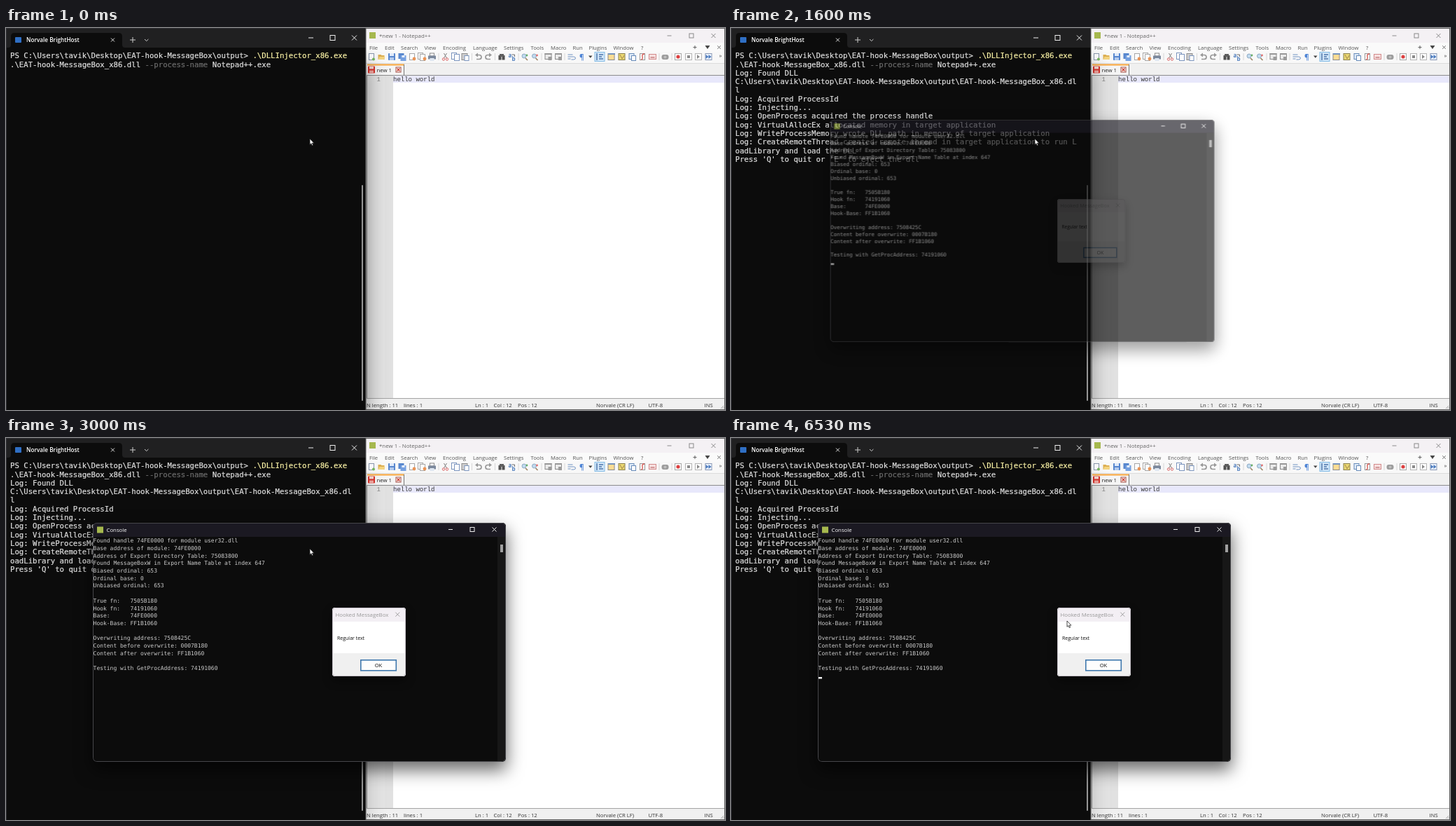
An HTML page that plays this animation: 1027x545 px, repeating every 6.57 s.

```html
<!DOCTYPE html>
<html lang="en">
<head>
<meta charset="utf-8">
<title>Hook demo</title>
<style>
html, body { margin: 0; width: 100%; height: 100%; overflow: hidden; background: #0c0c0c; }
#stage { position: absolute; left: 0; top: 0; width: 1027px; height: 545px; overflow: hidden; }
#stage > div, svg { position: absolute; left: 0; top: 0; display: block; }
text { white-space: pre; font-family: "Open Sans", "Noto Sans", sans-serif; }
.mono { font-family: "DejaVu Sans Mono", monospace; }
.courier { font-family: "Liberation Mono", monospace; }

#stage .loop, .loop { animation-duration: 6570ms; animation-iteration-count: infinite; animation-timing-function: linear; }
#stage .hard, .hard { animation-timing-function: step-end; }

#shade { width: 514px; height: 600px; box-shadow: 0 50px 30px rgba(0,0,0,.45); animation-name: shade; }
#logs { width: 513px; overflow: hidden; animation-name: logs; }
#caret { animation-name: caret; }
#blink { animation-name: blink; }
#stage > #console { left: 124px; top: 121px; width: 590px; height: 341px; z-index: 2; border-radius: 5px;
  box-shadow: 0 11px 25px 1px rgba(0,0,0,.58); transform-origin: 252px 142px; animation-name: open; }
#stage > #boxLayer { width: 1027px; height: 545px; z-index: 1; animation-name: raise; }
#box { position: absolute; left: 466px; top: 242px; width: 105px; height: 98px; border-radius: 4px;
  box-shadow: 0 6px 14px rgba(0,0,0,.45); transform-origin: 0 28px; animation-name: openBox; }
#console svg, #box svg { border-radius: inherit; }
#stage > #mouse { z-index: 9; animation-name: mouse; }

@keyframes shade { 0%, 23.74% { opacity: 1 } 26.33%, 100% { opacity: .45 } }
@keyframes caret { 0%, 12.18%, 100% { opacity: 0 } 3.5% { opacity: 1 } }
@keyframes logs {
  0% { height: 58px } 17.2% { height: 94px } 18.26% { height: 119px }
  19.3% { height: 156px } 20.2% { height: 181px } 20.8%, 100% { height: 200px }
}
@keyframes open {
  0%, 23.74% { opacity: 0; transform: scale(.9) }
  24.35% { opacity: .65; transform: scale(.929) }
  24.9% { opacity: 1; transform: scale(.968) }
  26.33% { opacity: 1; transform: scale(.998) }
  27.4%, 100% { opacity: 1; transform: none }
}
@keyframes openBox {
  0%, 23.74% { opacity: 0; transform: scale(.9) }
  24.35% { opacity: .5; transform: scale(.928) }
  25.2% { opacity: 1; transform: scale(.98) }
  26.5%, 100% { opacity: 1; transform: none }
}
@keyframes raise { 0% { z-index: 1 } 26.9%, 100% { z-index: 3 } }
@keyframes blink {
  0%, 47.64%, 63.93%, 80.21%, 96.35%, 100% { opacity: 1 }
  39.57%, 55.86%, 71.99%, 88.74% { opacity: 0 }
}
@keyframes mouse {
  0%, 46.73% { transform: translate(434px, 158px); animation-timing-function: ease-in-out }
  54.8% { transform: translate(473px, 259px) }
  58.3% { transform: translate(476px, 261px) }
  60.9% { transform: translate(480px, 261px) }
  62.86%, 68% { transform: translate(484px, 261px) }
  71.8%, 100% { transform: translate(480px, 261px) }
}
</style>
</head>
<body>
<div id="stage">
  <svg id="desk" width="1027" height="545"></svg>
  <div id="shade" class="loop"></div>
  <div id="logs" class="loop hard"><svg id="logText" width="513" height="545"></svg></div>
  <div id="console" class="loop"><svg id="consoleArt" width="590" height="341" viewBox="124 121 590 341"></svg></div>
  <div id="boxLayer" class="loop hard">
    <div id="box" class="loop"><svg id="boxArt" width="105" height="98" viewBox="466 242 105 98"></svg></div>
  </div>
  <div id="mouse" class="loop"><svg width="10" height="14" style="overflow:visible">
    <path d="M0 0V8.4L1.9 6.7 3.2 9.7 4.6 9.1 3.3 6.2H5.9Z" fill="#fff" stroke="#222" stroke-width=".8"/>
  </svg></div>
</div>
<script>
const $ = id => document.getElementById(id);
const esc = s => s.replace(/&/g, '&amp;').replace(/</g, '&lt;').replace(/>/g, '&gt;');
const rect = (x, y, w, h, fill, more = '') => `<rect x="${x}" y="${y}" width="${w}" height="${h}" fill="${fill}" ${more}/>`;
const frame = (x, y, w, h, stroke, width = 1, fill = 'none') =>
  rect(x, y, w, h, fill, `stroke="${stroke}" stroke-width="${width}"`);
const line = (d, stroke, width = 1) => `<path d="${d}" fill="none" stroke="${stroke}" stroke-width="${width}"/>`;
const shape = (d, fill) => `<path d="${d}" fill="${fill}"/>`;
const disc = (x, y, r, fill, more = '') => `<circle cx="${x}" cy="${y}" r="${r}" fill="${fill}" ${more}/>`;
const text = (x, y, s, size, fill, more = '') =>
  `<text x="${x}" y="${y}" font-size="${size}" fill="${fill}" ${more}>${s.includes('<tspan') ? s : esc(s)}</text>`;
const span = (s, fill) => `<tspan fill="${fill}" stroke="${fill}">${esc(s)}</tspan>`;
const mono = 'class="mono"';

const cross = (x, y, r, c, w = 1) => line(`M${x - r} ${y - r}l${2 * r} ${2 * r}M${x - r} ${y + r}l${2 * r} ${-2 * r}`, c, w);
const windowButtons = (xs, y, r, c) =>
  line(`M${xs[0] - r} ${y}h${2 * r}`, c) + frame(xs[1] - r, y - r, 2 * r, 2 * r, c) + cross(xs[2], y, r, c);

// Terminal window
const plain = '#dedede';
const termRow = (n, s) => text(6, 43.2 + n * 12.31, s, 10.66, plain, `${mono} stroke="${plain}" stroke-width=".22"`);

function terminal() {
  const user = 'tavik';
  return rect(0, 0, 514, 545, '#0c0c0c') + rect(0, 0, 514, 28, '#202021') +
    shape('M3 28q4 0 4-4V12q0-5 5-5H161q5 0 5 5V24q0 4 4 4Z', '#0c0c0c') +
    rect(13, 13, 9, 8, '#2f6fc4', 'rx="1"') +
    text(29, 20, 'Norvale BrightHost', 8.2, '#fff', 'font-weight="600"') +
    cross(152.5, 17, 2.5, '#ddd') +
    line('M177 17h8M181 13v8', '#ccc') + line('M198 16l2.7 2.6 2.7-2.6', '#ccc') +
    windowButtons([435.5, 466.5, 497.5], 14, 3.5, '#eee') +
    termRow(0, span(`PS C:\\Users\\${user}\\Desktop\\EAT-hook-MessageBox\\output> `, plain) +
      span('.\\DLLInjector_x86.exe', '#f9f1a5')) +
    termRow(1, span('.\\EAT-hook-MessageBox_x86.dll ', plain) +
      span('--process-name', '#6c6c6c') + span(' Notepad++.exe', plain)) +
    `<g id="caret" class="loop hard">${rect(377.6, 45.5, 1.2, 12, '#fff')}</g>` +
    rect(508, 224, 2, 308, '#969696', 'rx="1"') +
    line('M.5 0V545M0 .5H514', '#303035');
}

const logLines = [
  'Log: Found DLL',
  'C:\\Users\\tavik\\Desktop\\EAT-hook-MessageBox\\output\\EAT-hook-MessageBox_x86.dl',
  'l',
  'Log: Acquired ProcessId',
  'Log: Injecting...',
  'Log: OpenProcess acquired the process handle',
  'Log: VirtualAllocEx allocated memory in target application',
  'Log: WriteProcessMemory wrote DLL path in memory of target application',
  'Log: CreateRemoteThread created remote thread in target application to run L',
  'oadLibrary and load the DLL',
  "Press 'Q' to quit or 'E' to eject the dll"
];

// Toolbar icons, each centred on (x, 41)
const Y = 41;
const page = (x, c = '#7788a0', y = Y) => frame(x - 3.5, y - 4.5, 7, 9, c, 1, '#fff');
const icon = {
  fresh: x => page(x) + disc(x + 3, Y + 3.5, 2, '#62ae45'),
  open: x => shape(`M${x - 5} 45v-7h4l1 1h4v6z`, '#d9a437') + shape(`M${x - 5} 45l2-4h8l-2 4z`, '#f5cf6a'),
  save: x => rect(x - 5, 36, 10, 10, '#3d74c7', 'rx="1"') + rect(x - 3, 36, 6, 4, '#dce8fa') + rect(x - 3, 42, 6, 4, '#a9c4ec'),
  saveAll: x => rect(x - 5, 36, 8, 8, '#3d74c7') + rect(x - 2, 39, 8, 8, '#5f91dc') + rect(x, 39, 4, 3, '#e3edfc'),
  close: x => page(x, '#999') + disc(x + 3, 44, 2.4, '#e8833a'),
  closeAll: x => page(x - 2, '#999', 40) + page(x + 1, '#999', 42) + disc(x + 4, 44, 2.4, '#e8833a'),
  print: x => frame(x - 3, 36, 6, 4, '#777', 1, '#fff') + rect(x - 5.5, 39.5, 11, 5, '#66758c') + rect(x - 3, 43, 6, 4, '#dbe5f2'),
  cut: x => line(`M${x - 2} 36l4 7M${x + 2} 36l-4 7`, '#666') +
    disc(x - 2.5, 44.5, 1.7, 'none', 'stroke="#d44a4a"') + disc(x + 2.5, 44.5, 1.7, 'none', 'stroke="#d44a4a"'),
  copy: x => page(x - 2, '#6684b4', 40) + page(x + 2, '#6684b4', 42),
  paste: x => frame(x - 5, 36.5, 8, 9, '#7b7b7b', 1, '#c9c9c9') + frame(x - 1, 39.5, 6, 7, '#6684b4', 1, '#fff'),
  undo: x => line(`M${x - 3} 38.5h4q3 0 3 3t-3 3h-4`, '#888', 1.7) + shape(`M${x - 5} 38.5l4-3v6z`, '#888'),
  redo: x => line(`M${x + 3} 38.5h-4q-3 0-3 3t3 3h4`, '#888', 1.7) + shape(`M${x + 5} 38.5l-4-3v6z`, '#888'),
  find: x => rect(x - 4.5, 39, 4, 6.5, '#333') + rect(x + .5, 39, 4, 6.5, '#333') + rect(x - 3, 37, 6, 4, '#444'),
  replace: x => text(x - 5, 42, 'a', 8, '#3268b3', 'font-weight="700"') + text(x, 47, 'b', 8, '#3268b3', 'font-weight="700"') + line(`M${x} 38h4v3`, '#555'),
  zoomIn: x => disc(x - 1, 40, 3, '#b9d6ee', 'stroke="#7a9bb8"') + line(`M${x + 1} 43l3 3`, '#8a6d4a', 1.6) + disc(x + 3, 39, 1.4, '#4da34d'),
  zoomOut: x => disc(x - 1, 40, 3, '#b9d6ee', 'stroke="#7a9bb8"') + line(`M${x + 1} 43l3 3`, '#8a6d4a', 1.6) + disc(x + 3, 39, 1.4, '#d55'),
  sync: x => frame(x - 4.5, 36.5, 9, 8, '#777', 1, '#e9e9e9') + rect(x - 5, 36, 10, 2, '#888') + rect(x, 41, 5, 5, '#8b8b8b'),
  wrap: x => line(`M${x - 5} 38h7M${x - 5} 41h8q3 0 3 2t-3 2h-3M${x - 5} 44h4`, '#557fb8'),
  pilcrow: x => text(x - 3, 45, '¶', 10, '#2f6fd0', 'font-weight="700"'),
  guide: x => rect(x - 7, 34.5, 14, 13, '#cce4f7', 'stroke="#6fb1e4"') + line(`M${x - 4} 36v10`, '#2f5f9e', 1.5) +
    line(`M${x - 1} 38h6M${x - 1} 41h4M${x - 1} 44h6`, '#2f5f9e', 1.3),
  panel: x => frame(x - 5, 36.5, 9, 9, '#777', 1, '#ffd983') + rect(x - 5, 36, 10, 2, '#5d82b5'),
  map: x => frame(x - 5, 36.5, 9, 9, '#776a30', 1, '#e7d35c') + line(`M${x - 3} 38l3 6 3-5`, '#946e2a'),
  list: x => frame(x - 4.5, 36.5, 7, 8, '#4e78af', 1, '#dce9f9') + frame(x - 1, 39.5, 6, 7, '#4e78af', 1, '#fff'),
  func: x => page(x, '#888') + line(`M${x - 2} 45q3 0 2-4t3-4`, '#d4433b', 1.4),
  folder: x => frame(x - 5, 37.5, 10, 7, '#c77', 1, '#f7dede') + rect(x - 3, 41, 6, 2, '#c88'),
  watch: x => rect(x - 5, 38, 10, 7, '#8d8d8d', 'rx="3"') + disc(x, 41.5, 2, '#b5b5b5'),
  record: x => frame(x - 4.5, 36.5, 9, 9, '#999', 1, '#fff') + disc(x, Y, 2.6, '#d81f1f'),
  stop: x => frame(x - 4.5, 36.5, 9, 9, '#aaa', 1, '#fff') + rect(x - 2, 39, 4, 4, '#777'),
  play: x => frame(x - 4.5, 36.5, 9, 9, '#aaa', 1, '#fff') + shape(`M${x - 2} 38l4 3-4 3z`, '#777'),
  forward: x => frame(x - 4.5, 36.5, 9, 9, '#78a', 1, '#eef5ff') + shape(`M${x - 4} 38l4 3-4 3zM${x} 38l4 3-4 3z`, '#2f66b5')
};
const toolbar = {
  fresh: 522, open: 536.5, save: 551, saveAll: 565.5, close: 580, closeAll: 594, print: 608.5, cut: 627.5, copy: 642,
  paste: 656, undo: 675, redo: 689, find: 708, replace: 722.5, zoomIn: 741, zoomOut: 755.5, wrap: 807.5, pilcrow: 822,
  guide: 848, panel: 865, map: 880, list: 894.5, func: 909, folder: 923.5, watch: 941.5, record: 960, stop: 975,
  play: 989, forward: 1003.5
};
const menu = {
  File: 519, Edit: 541, Search: 564, View: 597.5, Encoding: 624, Language: 667, Settings: 711, Tools: 749.5,
  Macro: 778, Run: 809.5, Plugins: 832.5, Window: 867.5, '?': 907
};
const status = {
  'N length : 11': 515, 'lines : 1': 568, 'Ln : 1': 670, 'Col : 12': 696.5, 'Pos : 12': 731,
  'Norvale (CR LF)': 843, 'UTF-8': 917.5, 'INS': 997.5
};
const labels = (set, y, size, fill) => Object.entries(set).map(([s, x]) => text(x, y, s, size, fill)).join('');

function editor() {
  const separators = [618, 665.5, 698.5, 732, 765, 798, 933, 951];
  return rect(514, 0, 513, 545, '#f0f0f0') + rect(514, 0, 513, 21, '#f4f1f4') +
    rect(514, 21, 513, 13, '#fafafa') + rect(514, 34, 513, 17, '#f8f8f8') +
    rect(519, 6, 9, 9, '#a6b84e') +
    text(533, 13.8, '*new 1 - Notepad++', 7.9, '#666') +
    windowButtons([947.5, 979, 1010.5], 11, 3, '#8a8a8a') +
    labels(menu, 30.6, 7.7, '#555') +
    line('M981.5 27.5h5M984 25v5', '#555', .9) + shape('M998.5 25h7l-3.5 5z', '#444') + cross(1018.5, 27.5, 2.2, '#666') +
    '<g opacity=".85">' +
    separators.map(x => line(`M${x} 36v10`, '#d2d2d2')).join('') +
    Object.entries(toolbar).map(([name, x]) => icon[name](x)).join('') +
    icon.sync(774.5) + icon.sync(789) +
    shape('M832 39.5h5.5l-2.7 3.2z', '#222') + text(1018.5, 42, '»', 8, '#333') + '</g>' +
    line('M514 50.5H1027', '#dcdcdc') +
    rect(516, 52, 53, 15, '#f5f5f5') + rect(516, 51.5, 53, 2, '#faa63a') + line('M568.5 52V67', '#777') +
    rect(517, 54.5, 10, 10, '#d8322b', 'rx="1"') + rect(519, 55, 6, 3.5, '#f8d8d4') + rect(519, 60.5, 6, 4, '#f3aaa4') +
    text(529.5, 63, 'new 1', 7.8, '#222') +
    frame(557, 56, 7, 7, '#a24a40', 1, '#fff') + cross(560.5, 59.5, 2, '#c83a2c', 1.3) +
    rect(515, 67, 511, 462, '#fff') + rect(516, 68, 25, 461, '#e4e4e4') + rect(541, 68, 12, 461, '#e1e1e1') +
    rect(553, 68, 473, 10, '#e8e8fb') +
    line('M515 67.5H1026M515.5 67V529', '#8c8c8c') + line('M515 528.5H1026', '#a4a4a4') +
    text(529.5, 75.7, '1', 9, '#888', 'class="courier"') +
    text(553, 75.7, 'hello world', 9, '#333', 'class="courier"') +
    labels(status, 540.8, 7.7, '#333') +
    line('M1021 543l4-4M1023.5 543l2-2', '#aaa') +
    line('M514 0V545M514 .5H1027M514 544.5H1027M1026.5 0V545', '#606060');
}

// Console window
const report = [
  'Found handle 74FE0000 for module user32.dll', 'Base address of module: 74FE0000',
  'Address of Export Directory Table: 75083800', 'Found MessageBoxW in Export Name Table at index 647',
  'Biased ordinal: 653', 'Ordinal base: 0', 'Unbiased ordinal: 653', '',
  'True fn:   7505B180', 'Hook fn:   74191060', 'Base:      74FE0000', 'Hook-Base: FF1B1060', '',
  'Overwriting address: 7508425C', 'Content before overwrite: 0007B180', 'Content after overwrite: FF1B1060', '',
  'Testing with GetProcAddress: 74191060'
];

const consoleWindow = () =>
  rect(124, 121, 590, 341, '#0c0c0c') + rect(124, 121, 590, 20, '#1b1922') +
  rect(130, 126.5, 9, 9, '#a6b84e') +
  text(143.5, 133.6, 'Console', 7.8, '#fff') +
  windowButtons([635, 666, 697.5], 130.5, 3, '#eee') +
  rect(702, 141, 11, 320, '#171717') + rect(706, 152, 4, 11, '#a0a0a0') +
  report.map((s, i) => text(124.6, 149.3 + i * 10.69, s, 8, '#cccccc', mono)).join('') +
  `<g id="blink" class="loop hard">${rect(125, 341, 5, 2.5, '#f2f2f2')}</g>` +
  rect(124.5, 121.5, 589, 340, 'none', 'rx="5" stroke="#46464a"');

const messageBox = () =>
  rect(466, 242, 105, 98, '#fff') + rect(466, 242, 105, 20, '#f3eff4') + rect(466, 307, 105, 33, '#f0f0f0') +
  text(470.5, 254.8, 'Hooked MessageBox', 7.8, '#999') + cross(559.3, 251.7, 3, '#999', .9) +
  text(473, 287.6, 'Regular text', 7, '#111') +
  frame(506.8, 316.8, 50.5, 15, '#3f78ad', 1.6, '#fdfdfd') +
  text(532, 327, 'OK', 7.6, '#111', 'text-anchor="middle"') +
  rect(466.5, 242.5, 104, 97, 'none', 'rx="4" stroke="#b9b3bb" stroke-width=".8"');

$('desk').innerHTML = terminal() + editor();
$('logText').innerHTML = logLines.map((s, i) => termRow(i + 2, s)).join('');
$('consoleArt').innerHTML = consoleWindow();
$('boxArt').innerHTML = messageBox();
</script>
</body>
</html>
```
